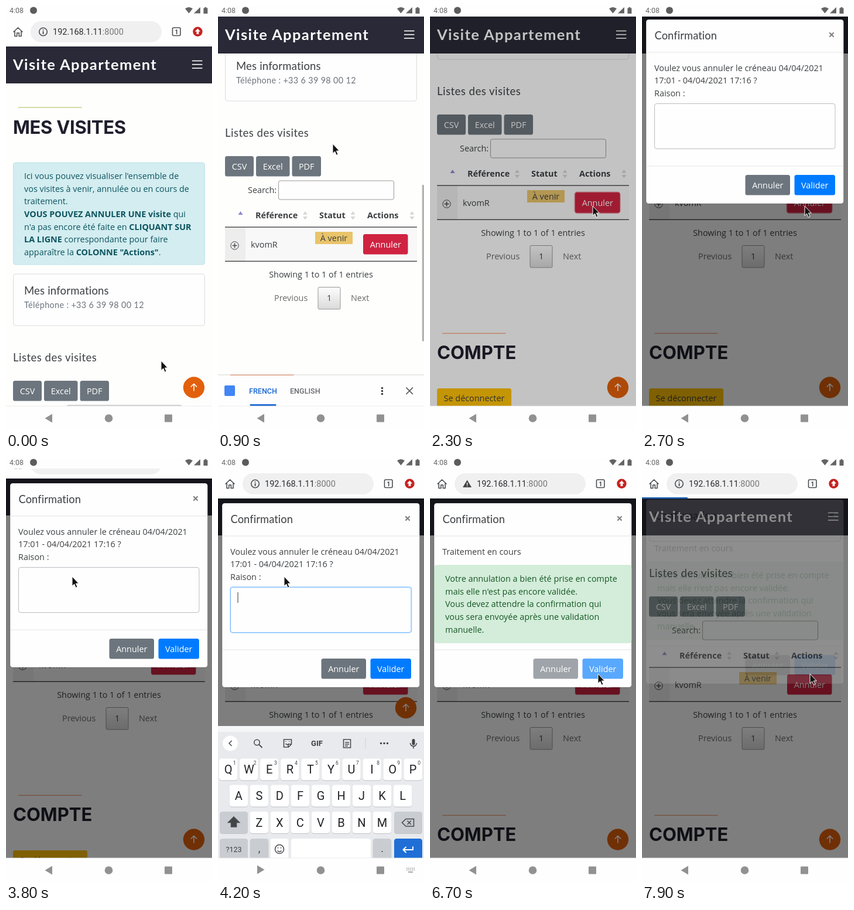
Recreate the animation shown at these times as an HTML page. Size 352 by 723 pixels, loop 8 s.

```html
<!DOCTYPE html>
<html lang="fr">
<head>
<meta charset="utf-8">
<title>Visite Appartement</title>
<style>
html, body { margin: 0; width: 100%; height: 100%; overflow: hidden; background: #fefefd; }
svg { display: block; font: 14.4px "Open Sans", sans-serif; fill: #3c3f42; }
text { white-space: pre; }
.roboto { font-family: Roboto, sans-serif; }
.lato { font-family: Lato, sans-serif; }
.inter { font: 700 31px Inter, sans-serif; fill: #1f1e2c; }
.mid { text-anchor: middle; }
.bold { font-weight: 700; }
.white { fill: #fff; }
.info { fill: #0c5460; }
.line { fill: none; stroke: #4a4d51; stroke-width: 1.6; }
</style>
</head>
<body>
<svg id="stage" width="352" height="723" viewBox="0 0 352 723"></svg>
<script>
const LOOP = 8000, STEP = 100, LINE = 21.65;
const WORD = 'because';

const text = (x, y, s, cls = '', extra = '') => `<text x="${x}" y="${y}" class="${cls}" ${extra}>${s}</text>`;
const rect = (x, y, w, h, fill, r = 0, extra = '') =>
  `<rect x="${x}" y="${y}" width="${w}" height="${h}" rx="${r}" fill="${fill}" ${extra}/>`;
const disc = (x, y, r, fill, extra = '') => `<circle cx="${x}" cy="${y}" r="${r}" fill="${fill}" ${extra}/>`;
const path = (d, fill) => `<path d="${d}" fill="${fill}"/>`;
const line = (d, extra = '') => `<path class="line" d="${d}" ${extra}/>`;
const group = (id, ...parts) => `<g id="${id}">${parts.join('')}</g>`;
const button = (x, y, w, label, fill) =>
  rect(x, y, w, 34.5, fill, 3.6) + text(x + w / 2, y + 22.5, label, 'mid white');
const paragraph = (x, y, lines, cls) => lines.map((s, i) => text(x, y + i * LINE, s, cls)).join('');
const dots = (x, y, dx, dy, r, fill) => [-1, 0, 1].map(k => disc(x + k * dx, y + k * dy, r, fill)).join('');
const b = s => `<tspan font-weight="700">${s}</tspan>`;

const sorter = x => path(`M${x - 4} 738.5l4-5.5 4 5.5zM${x - 4} 742l4 5.5 4-5.5z`, '#d6d6d8');

const page = group('page',
  rect(21, 172.5, 108.5, 1, '#a9c04d'),
  text(12, 218, 'MES VISITES', 'inter', 'letter-spacing="-.3"'),
  rect(12.5, 267, 327, 174, '#d3edf0', 4, 'stroke="#bee3e9"'),
  paragraph(31, 295, [
    "Ici vous pouvez visualiser l'ensemble de",
    'vos visites à venir, annulée ou en cours de',
    'traitement.',
    b('VOUS POUVEZ ANNULER UNE visite') + ' qui',
    "n'a pas encore été faite en " + b('CLIQUANT SUR'),
    b('LA LIGNE') + ' correspondante pour faire',
    'apparaître la ' + b('COLONNE "Actions"') + '.'], 'info'),
  rect(12.5, 457, 327, 88, '#fefefe', 4, 'stroke="#dcdcdc"'),
  text(31, 492, 'Mes informations', 'lato', 'font-size="18.5" letter-spacing=".2"'),
  text(31, 515, 'Téléphone : +33 6 39 98 00 12', 'lato', 'letter-spacing=".35" style="fill:#6c757d"'),
  text(12, 605.5, 'Listes des visites', 'lato', 'font-size="18.5" letter-spacing=".5"'),
  button(12, 639, 49, 'CSV', '#6c757d'),
  button(65, 639, 57.5, 'Excel', '#6c757d'),
  button(126.5, 639, 49.5, 'PDF', '#6c757d'),
  text(51, 702, 'Search:'),
  rect(103.5, 681, 197, 32, '#fefefe', 3, 'stroke="#9a9a9a"'),
  path('M34.5 739l4-6 4 6z', '#8d89d2'),
  text(64, 744.5, 'Référence', 'bold'), sorter(149),
  text(173, 744.5, 'Statut', 'bold'), sorter(230.5),
  text(255, 744.5, 'Actions', 'bold'), sorter(331.5),
  rect(12, 760, 328, 58, '#f8f8f8'),
  rect(12, 760, 35, 58, '#ededed'),
  rect(12, 759.5, 328, 1.1, '#151515'),
  rect(12, 817.7, 328, 1.1, '#151515'),
  disc(28.5, 791.5, 6.7, 'none', 'stroke="#444"'),
  line('M24.5 791.5h8M28.5 787.5v8', 'stroke-width="1"'),
  text(56, 794.5, 'kvomR'),
  rect(166, 768, 64, 21, '#e9c46a'),
  text(198, 784, 'À venir', 'mid'),
  rect(246.5, 770.5, 79, 37.5, '#e5909b', 5, 'id="ring"'),
  button(248, 772, 76.5, 'Annuler', '#cf2341'),
  text(176, 846, 'Showing 1 to 1 of 1 entries', 'mid'),
  text(96, 886, 'Previous', '', 'style="fill:#6b6b6b"'),
  rect(171, 862.5, 38, 37.5, 'url(#pager)', 2, 'stroke="#979797"'),
  text(190, 886, '1', 'mid'),
  text(227, 886, 'Next', '', 'style="fill:#6b6b6b"'),
  rect(21, 1011.7, 108.5, 1, '#ee8757'),
  text(12, 1056, 'COMPTE', 'inter'),
  rect(12, 1106, 127, 34.5, '#ffc107', 3.6),
  text(75.5, 1128, 'Se déconnecter', 'mid'));

const header = group('header',
  rect(0, 69, 352, 63, '#292937'),
  text(12, 109, 'Visite Appartement', 'lato bold white', 'font-size="25.5" letter-spacing="1.4"'),
  [93.5, 99.7, 106].map(y => rect(318, y - .8, 17.5, 1.6, '#fff')).join(''));

const toTop = group('toTop',
  disc(321, -31.5, 18.2, '#e2600b'),
  line('M321 -25.5v-12M315.8 -32.5l5.2 -5.2 5.2 5.2', 'style="stroke:#fff"'));

const modal = group('modal',
  rect(7, 77, 337.5, 314, '#fefefe', 4.3, 'stroke="#000" stroke-opacity=".2"'),
  text(21.5, 111, 'Confirmation', 'lato', 'font-size="18.3" letter-spacing=".1"'),
  text(324, 110, '×', 'mid bold', 'font-size="20" style="fill:#808080"'),
  rect(7.5, 132.5, 336.5, 1, '#e3e6e9'),
  group('ask',
    paragraph(21, 164.5, [
      'Voulez vous annuler le créneau 04/04/2021',
      '17:01 - 04/04/2021 17:16 ?',
      'Raison :']),
    rect(20, 219, 311.5, 80, '#bfdeff', 5, 'id="glow"'),
    rect(21.5, 220.5, 308.5, 77, '#fefefe', 3.6, 'id="field" stroke="#b9bcc0"'),
    text(33, 243, '', '', 'id="typed"'),
    rect(33, 245.5, 0, 1, '#777', 0, 'id="underline"'),
    rect(33.5, 229, 1, 18, '#333', 0, 'id="caret"')),
  group('done',
    text(21, 164.5, 'Traitement en cours'),
    group('notice',
      rect(7.5, 183, 336.5, 132, '#d4edda', 4, 'stroke="#c3e6cb"'),
      `<g style="fill:#155724">${paragraph(26, 211, [
        'Votre annulation a bien été prise en compte',
        "mais elle n'est pas encore validée.",
        'Vous devez attendre la confirmation qui',
        'vous sera envoyée après une validation',
        'manuelle.'])}</g>`)),
  rect(7.5, 326.5, 336.5, 1, '#e3e6e9'),
  group('actions',
    button(176.5, 342, 76.5, 'Annuler', '#6c757d'),
    button(260.5, 342, 69.5, 'Valider', '#007bff')));

const key = (cx, cy, w, fill = '#fff') =>
  rect(cx - w / 2, cy - 17.5, w, 37, '#bfc2c6', 4.5) + rect(cx - w / 2, cy - 18.5, w, 37, fill, 4.5);
const GREY = '#c9cdd2';

function letterKeys(upper) {
  const rows = [['qwertyuiop', 17.7, 521], ['asdfghjkl', 35.3, 566], ['zxcvbnm', 70.2, 611.5]];
  return rows.map(([letters, x0, y], row) => [...letters].map((c, i) => {
    const x = x0 + 35.05 * i;
    const hint = row ? '' : text(x + 10.5, y - 8.5, (i + 1) % 10, 'roboto mid', 'font-size="8.5"');
    return key(x, y, 31.5) + hint +
      text(x, y + 7, upper ? c.toUpperCase() : c, 'roboto mid', 'font-size="20" style="fill:#202124"');
  }).join('')).join('') + key(27, 611.5, 48, GREY) +
    `<path d="M27 602l9.5 9.5h-5v7.500h-9v-7.500h-5z" class="line" style="fill:${upper ? '#444' : 'none'}"/>`;
}

const suggestion = (id, x, s) => group(id, text(x, 483, s, 'roboto mid', 'font-size="16.5"'));
const mic = rect(331.5, 469, 5, 10.5, '#444', 2.5) + line('M328.500 476a5.500 5.500 0 0 0 11 0M334 481.500v4');

const keyboard = group('keyboard',
  rect(0, 457, 352, 226, '#e8eaed'),
  disc(21, 476.5, 13, '#fff'), mic,
  group('caps',
    line('M23.5 472l-4.500 4.500 4.500 4.500'),
    disc(66.5, 475, 4.7, 'none', 'class="line"'), line('M70 478.500l5.500 5.500', 'style="stroke-width:2"'),
    line('M112.500 470h13v8l-5 5h-8zM125 478h-5v5M115.500 477q3 3.500 6 0M116 473v1M122 473v1'),
    text(169, 481, 'GIF', 'roboto bold mid', 'font-size="13"'),
    line('M214.500 470h12v14h-12zM217.500 470h6M217 475h7M217 478h7M217 481h5'),
    rect(251.5, 467, 1, 19, '#cdd0d4'),
    dots(284, 476.5, 5.5, 0, 1.7, '#444'),
    letterKeys(true)),
  group('lower',
    line('M19 472l4.500 4.500-4.500 4.500'),
    suggestion('left', 80, 'been'), suggestion('centre', 175, WORD), suggestion('right', 275, 'became'),
    group('dividers', rect(122, 467, 1, 19, '#cdd0d4'), rect(227, 467, 1, 19, '#cdd0d4')),
    letterKeys(false)),
  key(325, 611.5, 48, GREY),
  line('M321 605.500h13.500v12.500h-13.500l-6.500-6.250zM323.500 608.500l6.500 6.500M330 608.500l-6.500 6.500'),
  key(27, 657.5, 48, GREY), text(27, 662, '?123', 'roboto mid', 'font-size="12.500"'),
  key(70.5, 657.5, 31.5, GREY), text(70.5, 662, ',', 'roboto mid', 'font-size="18"'),
  key(105, 657.5, 31.5), disc(105, 657, 7.5, 'none', 'class="line"'),
  line('M101.500 659.500q3.500 4 7 0M102.500 654v1.500M107.500 654v1.500'),
  key(193, 657.5, 136.5),
  key(280.5, 657.5, 31.5, GREY), text(280.5, 662, '.', 'roboto mid', 'font-size="18"'),
  key(325, 657.5, 48, '#1f6fd6'),
  line('M333 652.500v5.500h-16M321.500 653l-5 5 5 5', 'style="stroke:#fff;stroke-width:2"'));

const addressBar = group('addressBar',
  rect(0, 18, 352, 51, '#fefefe'),
  line('M12.5 44.500l8-7.500 8 7.500M15 43v8.500h3.700v-5.500h3.600v5.500h3.700v-8.500'),
  rect(42, 26, 224, 36, '#f0f0f1', 18),
  group('infoIcon', disc(63.5, 44, 6.8, 'none', 'class="line"'),
    rect(62.7, 43, 1.7, 5, '#444'), rect(62.7, 40, 1.7, 1.7, '#444')),
  group('warnIcon', path('M63.5 37.500l7.500 12.500h-15z', '#444'),
    rect(62.8, 42, 1.5, 3.7, '#fff'), rect(62.8, 46.7, 1.5, 1.5, '#fff')),
  text(80, 49, '192.168.1.11<tspan fill="#777">:8000</tspan>', 'roboto', 'font-size="14.5" style="fill:#2b2c2e"'),
  rect(284.5, 37, 13.5, 13.5, 'none', 2, 'class="line"'),
  text(291.3, 47.5, '1', 'roboto bold mid', 'font-size="10"'),
  disc(327.5, 43.7, 8.2, '#c5221f'),
  path('M327.5 38.500l4.700 5h-2.800v4.500h-3.800v-4.500h-2.800z', '#fff'),
  rect(0, 67, 0, 2.5, '#1f62b5', 0, 'id="loading"'));

const statusBar = rect(0, 0, 352, 18, '#fefefe') +
  text(6, 12, '4:08', 'roboto', 'font-size="12.500" style="fill:#666"') +
  disc(47, 7.5, 6, '#5c5c5c') +
  path('M306 4.500Q312.500 -.5 319 4.500L312.500 12.500ZM332 2V12.500H321ZM337.500 3.500h2v-1.500h3v1.500h2v9.500h-7z', '#646464');

const translateBar = group('translateBar',
  rect(0, 628, 352, 3, '#000', 0, 'opacity=".08"'),
  rect(0, 630, 352, 53, '#fefefe'),
  rect(11, 647, 18, 18, '#4285f4', 2),
  text(53, 661, 'FRENCH', 'roboto', 'font-size="12.600" font-weight="500" style="fill:#1a67d2"'),
  rect(54.5, 679, 45, 3, '#1a67d2', 1),
  text(123, 661, 'ENGLISH', 'roboto', 'font-size="12.600" font-weight="500" style="fill:#66696d"'),
  dots(280.5, 656.5, 0, 5, 1.7, '#333'),
  line('M321.500 650.500l11.500 11.500M333 650.500l-11.500 11.500'));

const navBar = rect(0, 682, 352, 41, '#fefefe') + rect(0, 681.7, 352, .8, '#e6e6e6') +
  group('back', path('M-6.500 0L6 -7.500V7.500z', '#919191')) +
  disc(175.5, 703, 6.8, '#919191') + rect(271, 696.5, 13, 13, '#919191', 1) +
  group('imeIcon', line('M322 699.500h14M322 702.500h14', 'style="stroke:#919191" stroke-dasharray="1.600 1.500"'),
    line('M325 706h8', 'style="stroke:#919191"'));

const cursor = group('cursor',
  '<path d="M0 0V16.500L3.700 13 6.300 19.200 9 18 6.400 12H11.300Z" fill="#111" stroke="#fff" stroke-width="1" stroke-linejoin="round"/>');

stage.innerHTML = `<defs><linearGradient id="pager" x2="0" y2="1">
  <stop stop-color="#fdfdfd"/><stop offset="1" stop-color="#dadada"/></linearGradient></defs>` +
  rect(0, 0, 352, 723, '#fefefd') + page + rect(348.7, 0, 3.3, 267, '#b3b3b3', 1.5, 'id="thumb"') +
  toTop + header + rect(0, 18, 352, 665, '#000', 0, 'id="backdrop"') + modal +
  rect(0, 457, 352, 226, '#f5f6f7', 0, 'id="imeArea"') + keyboard +
  addressBar + statusBar + translateBar + navBar + cursor;

const el = id => document.getElementById(id);
const move = (id, x, y, turn = 0) => el(id).setAttribute('transform', `translate(${x} ${y}) rotate(${turn})`);
const show = (id, on) => el(id).style.display = on ? '' : 'none';
const fade = (id, value) => el(id).style.opacity = value;
const set = (id, name, value) => el(id).setAttribute(name, value);

// Linear interpolation through alternating times and values.
function track(t, ...keys) {
  let i = 0;
  while (i + 2 < keys.length && t >= keys[i + 2]) i += 2;
  if (t <= keys[0] || i + 2 >= keys.length) return keys[i + 1];
  const [t0, v0, t1, v1] = keys.slice(i, i + 4);
  return v0 + (v1 - v0) * (t - t0) / (t1 - t0);
}

function draw(t) {
  const barY = track(t, 500, 0, 600, -40, 700, -51, 3700, -51, 4000, 0);
  const pageY = track(t, 600, 0, 700, -109, 800, -250, 900, -332, 1000, -332, 1200, -370, 1500, -403);
  const imeOpen = t >= 4100 && t < 6200;

  move('page', 0, pageY + barY);
  move('header', 0, barY);
  move('addressBar', 0, barY);
  move('toTop', 0, imeOpen ? 457.5 : 682);
  set('thumb', 'y', 172 - pageY * .4);
  fade('thumb', track(t, 500, 0, 600, 1, 1600, 1, 1900, 0));
  move('translateBar', 0, track(t, 500, 54, 900, 0, 1200, 0, 1700, 54));
  show('ring', t >= 2000 && t < 2900);

  fade('backdrop', track(t, 2100, 0, 2300, .23, 2500, .5));
  fade('modal', track(t, 2400, 0, 2600, .9, 2700, 1, 7700, 1, 7800, .55, 7900, .12));
  move('modal', 0, barY + track(t, 2400, -45, 2500, -24, 2600, -10, 2700, -3, 2800, 0, 7700, 0, 7800, -2, 7900, -6));

  const sent = t >= 6200;
  const focused = t >= 3900;
  show('ask', !sent);
  show('done', sent);
  show('notice', t >= 6700);
  fade('actions', sent ? .65 : 1);
  show('glow', focused);
  set('field', 'stroke', focused ? '#80bdff' : '#b9bcc0');

  const count = t < 4700 ? 0 : t < 5400 ? Math.min(6, Math.floor((t - 4600) / 100)) : 7;
  el('typed').textContent = WORD.slice(0, count);
  const typedWidth = count && !sent ? el('typed').getComputedTextLength() : 0;
  set('underline', 'width', typedWidth);
  set('caret', 'x', 33.5 + typedWidth);
  show('caret', focused && t < 5800);

  const typing = t >= 4700;
  show('caps', !typing);
  show('lower', typing);
  show('left', t < 5600);
  show('dividers', t < 5600);
  show('right', t < 5400);
  show('imeArea', imeOpen);
  const imeY = track(t, 3900, 226, 4000, 120, 4100, 40, 4200, 10, 4300, 3, 4400, 0, 6100, 0, 6200, 50, 6500, 226);
  move('keyboard', 0, imeY);
  show('keyboard', imeY < 226);
  show('imeIcon', t >= 4100 && t < 6400);
  const turn = track(t, 4000, 0, 4200, 180, 4400, 270, 6100, 270, 6500, 0);
  move('back', 73, 703 - Math.sin(turn * Math.PI / 360), turn);

  const warned = t >= 4700 && t < 7800;
  show('warnIcon', warned);
  show('infoIcon', !warned);
  set('loading', 'width', track(t, 7700, 0, 7900, 78));

  move('cursor',
    track(t, 0, 265, 300, 250, 500, 250, 900, 196, 1200, 196, 1800, 278, 3100, 278, 3500, 113, 5700, 113, 5900, 287),
    track(t, 0, 605, 300, 622, 500, 622, 900, 235, 1200, 235, 1800, 341, 3100, 341, 3500, 202, 5700, 202, 5900, 349, 6000, 349, 6300, 368));
}

const start = performance.now();
function frame() {
  const elapsed = (performance.now() - start) % LOOP;
  draw(Math.floor(elapsed / STEP) * STEP);
  requestAnimationFrame(frame);
}
frame();
</script>
</body>
</html>
```
